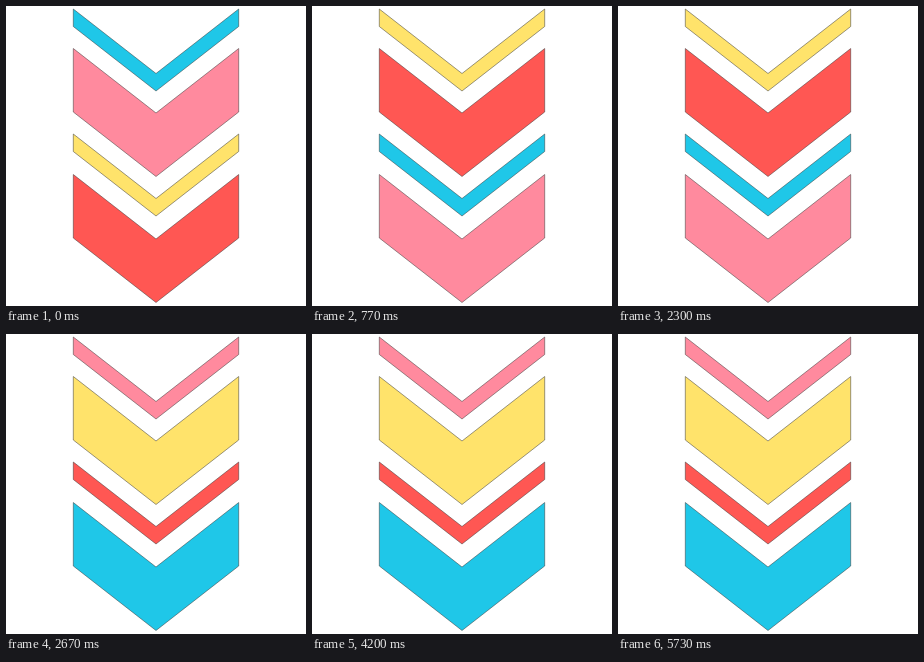
An HTML page for the animation above (6060 ms loop, 300x300 px).

```html
<!DOCTYPE html>
<html lang="en">
<head>
<meta charset="utf-8">
<title>Chevrons</title>
<style>
  html, body { margin: 0; height: 100%; overflow: hidden; background: #fff; }
  svg { display: block; width: 100vw; height: 100vh; }
  path { stroke: #333; stroke-width: .5; }
</style>
</head>
<body>
<svg viewBox="0 0 300 300"></svg>
<script>
const LOOP = 6060;
const PAIR = 2300 / 3; // two colour steps
const COLORS = ['#1fc7e8', '#ff8a9e', '#ffe36b', '#ff5753'];
const BANDS = [[3, 17.5], [42.5, 63.5], [128, 17.5], [168.5, 63.5]]; // top, thickness
const DROP = 64.5;

const svg = document.querySelector('svg');
const chevrons = BANDS.map(([top, thickness]) => {
  const path = document.createElementNS('http://www.w3.org/2000/svg', 'path');
  path.setAttribute('d',
    `M67.3 ${top}l82.7 ${DROP} 82.7 ${-DROP}v${thickness}l-82.7 ${DROP} -82.7 ${-DROP}z`);
  return svg.appendChild(path);
});

// Start of each step, on a 10 ms grid; odd steps come slightly early.
const starts = Array.from({ length: 16 }, (_, i) =>
  Math.round((Math.floor(i / 2) * PAIR + (i % 2) * 1100 / 3) / 10) * 10);

function draw() {
  const t = performance.now() % LOOP;
  const step = starts.filter(start => start <= t).length - 1;
  chevrons.forEach((path, i) => path.setAttribute('fill', COLORS[(i - step + 16) % 4]));
  requestAnimationFrame(draw);
}
draw();
</script>
</body>
</html>
```
